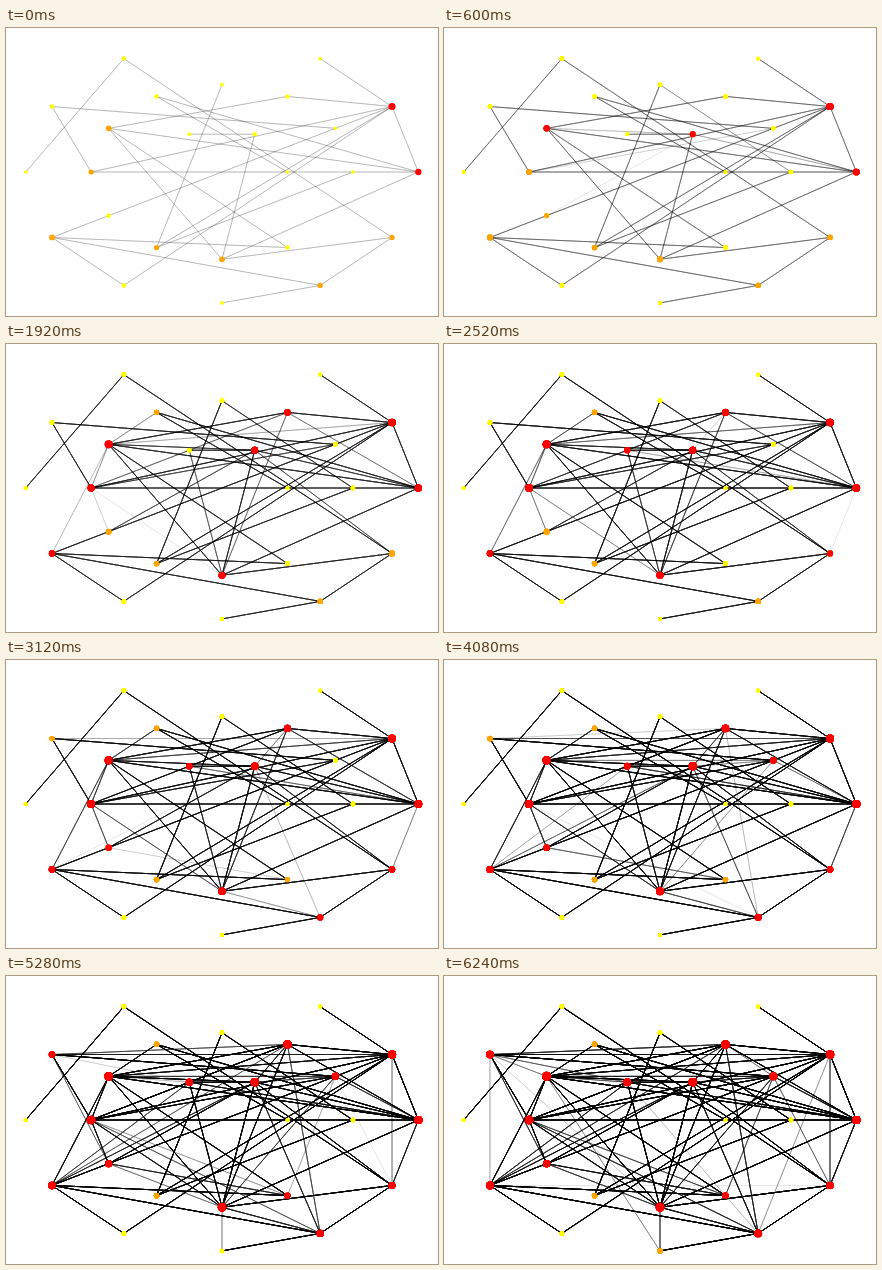
These frames come from a looping animation (432 by 288 pixels, 6360 ms). An HTML page with a canvas:

```html
<!DOCTYPE html>
<html>
<head>
<meta charset="utf-8">
<style>
html, body { margin: 0; width: 100%; height: 100%; overflow: hidden; background: #fff; }
canvas { display: block; }
</style>
</head>
<body>
<canvas id="stage" width="432" height="288"></canvas>
<script>
const ctx = document.getElementById('stage').getContext('2d');
const STEP = 120, STEPS = 53;

// Nodes sit on three ellipses: a-l outer, A-L middle, 0-5 inner.
const initial = ('ig ib Ia I0 hL hG kl Kl al Gl Fl El el HK Ha HD HC Ga D5 Da Db ' +
  'EA EJ fC fc fe fF cb cd 45').split(' ');
// One of these joins the graph on every step.
const added = ('JA 5a 5H LG F5 5b 4D KG KD Ka HI HG Hl Hf GF GD 4K 4a 4G K5 ab Dc hl 5c FC f5 ' +
  'La HL L5 LD f4 Kc hK Gc fK hF FD lb dD GC LC H4 h4 Lb LK hH Hd lc hf 4c hD fb').split(' ');

function position(id) {
  const outer = 'abcdefghijkl'.indexOf(id), middle = 'ABCDEFGHIJKL'.indexOf(id);
  const [ring, turn] = outer >= 0 ? [3, outer / 12] : middle >= 0 ? [2, middle / 12] : [1, id / 6];
  const angle = turn * 2 * Math.PI;
  return [216 + 65.45 * ring * Math.cos(angle), 144 + 43.64 * ring * Math.sin(angle)];
}

const nodes = {};
for (const id of new Set(initial.join(''))) nodes[id] = position(id);

function drawEdges(edges) {
  ctx.lineWidth = 0.8;
  ctx.strokeStyle = 'rgba(0,0,0,.13)';
  for (const [from, to] of edges) {
    ctx.beginPath();
    ctx.moveTo(...nodes[from]);
    ctx.lineTo(...nodes[to]);
    ctx.stroke();
  }
}

function drawNodes(edges) {
  const ends = edges.join('');
  for (const id in nodes) {
    const degree = ends.split(id).length - 1;
    ctx.fillStyle = degree > 4 ? '#f00' : degree > 2 ? '#ffa500' : '#ff0';
    ctx.beginPath();
    ctx.arc(...nodes[id], 0.8 + 1.05 * Math.sqrt(degree), 0, 2 * Math.PI);
    ctx.fill();
  }
}

// Steps are painted over each other, so older edges grow darker.
function drawStep(n) {
  if (n === 0) {
    ctx.fillStyle = '#fff';
    ctx.fillRect(0, 0, 432, 288);
    drawEdges(initial);
    drawEdges(initial);
  }
  const edges = initial.concat(added.slice(0, n));
  drawEdges(edges);
  drawNodes(edges);
}

let drawn = -1;
const start = performance.now();

function tick() {
  const step = Math.floor((performance.now() - start) / STEP) % STEPS;
  if (step < drawn) drawn = -1;
  while (drawn < step) drawStep(++drawn);
  requestAnimationFrame(tick);
}
tick();
</script>
</body>
</html>
```
